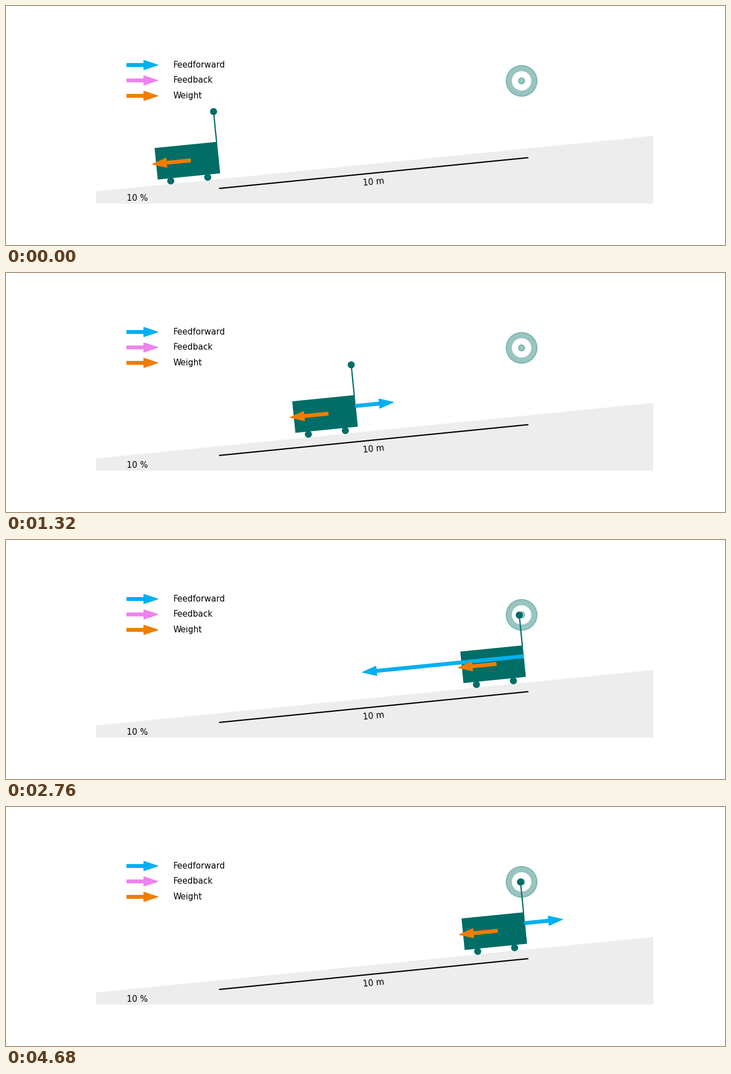
These frames come from a looping animation (1280x427 px, 4800 ms). A matplotlib script:

```python
import math
import matplotlib.pyplot as plt
from matplotlib.animation import FuncAnimation
from matplotlib.patches import Circle, FancyArrow, Polygon, Rectangle
from matplotlib.transforms import Affine2D

TEAL, BLUE, PINK, ORANGE = "#006d66", "#00b0f0", "#ee82ee", "#f07d00"
FRAMES, INTERVAL, DT = 40, 120, 0.125

SLOPE = math.atan(0.1)
SIN, COS = math.sin(SLOPE), math.cos(SLOPE)

# trapezoidal speed profile: 10 m in 3 s with 0.6 s ramps
DIST, END, RAMP = 10, 3.0, 0.6
SPEED = DIST / (END - RAMP)
ACCEL = SPEED / RAMP
DRIFT = 0.0073          # slow slip down the slope, m/s
SCALE = 0.8             # arrow length per m/s^2
WEIGHT = 9.81 * SIN

plt.rcParams["font.family"] = "DejaVu Sans"
DPI = 320 / 3
fig, ax = plt.subplots(figsize=(1280 / DPI, 427 / DPI), dpi=DPI)
ax.set_aspect("equal")
ax.set_xlim(-4, 14)
ax.set_ylim(-1, 4)
ax.axis("off")


def slope_point(along, up):
    return along * COS - up * SIN, along * SIN + up * COS


def arrow(x, y, length, color, angle=0.0, z=5):
    patch = FancyArrow(x, y, length * math.cos(angle), length * math.sin(angle),
                       width=0.1, head_width=0.3, head_length=0.45,
                       color=color, joinstyle="round", zorder=z)
    return ax.add_patch(patch)


def disc(x, y, r, color, alpha=None, z=2):
    return ax.add_patch(Circle((x, y), r, color=color, alpha=alpha, zorder=z))


# ground and scale
ax.add_patch(Polygon([(-4, -1), (-4, -0.6), (14, 1.2), (14, -1)],
                     fc="#ededed", ec="none", zorder=0))
ax.plot([0, DIST * COS], [-0.5, -0.5 + DIST * SIN], color="black", lw=1.5, zorder=1)
ax.text(DIST * COS / 2, -0.3, "10 m", ha="center", va="center",
        rotation=math.degrees(SLOPE))
ax.text(-3, -0.9, "10 %")

# legend
for y, color, label in ((3.5, BLUE, "Feedforward"), (3, PINK, "Feedback"),
                        (2.5, ORANGE, "Weight")):
    arrow(-3, y, 0.55, color)
    ax.text(-1.5, y, label, va="center")

# target
tx, ty = slope_point(DIST, 2)
disc(tx, ty, 0.5, TEAL, 0.4)
disc(tx, ty, 0.3, "white")
disc(tx, ty, 0.1, TEAL, 0.4)

# cart, in slope coordinates with its lower front corner at the origin
cart = [ax.add_patch(Rectangle((-2, 0), 2, 1, color=TEAL, zorder=3)),
        ax.plot([0, 0], [1, 2], color=TEAL, lw=1.5, zorder=3)[0]]
cart += [disc(x, y, 0.1, TEAL, z=3) for x, y in ((0, 2), (-1.6, -0.1), (-0.4, -0.1))]
pull = arrow(0, 0, 1, BLUE, z=4)
load = arrow(0, 0, 1, ORANGE, z=5)


def position(t):
    if t < RAMP:
        s = ACCEL * t * t / 2
    elif t < END - RAMP:
        s = SPEED * (t - RAMP / 2)
    else:
        s = DIST - ACCEL * max(END - t, 0) ** 2 / 2
    return s - DRIFT * t


def feedforward(t):
    if t <= RAMP:
        return WEIGHT + ACCEL
    if END - RAMP < t <= END:
        return WEIGHT - ACCEL
    return WEIGHT


def place(patch, along, up, force):
    x, y = slope_point(along, up)
    size = SCALE * force
    patch.set_data(x=x, y=y, dx=size * COS, dy=size * SIN)


def draw(i):
    t = i * DT
    s = position(t)
    move = Affine2D().translate(s, 0).rotate(SLOPE) + ax.transData
    for part in cart:
        part.set_transform(move)
    place(load, s - 0.9, 0.5, -WEIGHT)
    place(pull, s, 0.66, feedforward(t))
    pull.set_visible(i > 0)
    return cart + [pull, load]


anim = FuncAnimation(fig, draw, frames=FRAMES, interval=INTERVAL,
                     init_func=lambda: draw(0), repeat=True, repeat_delay=0)
plt.show()
```
